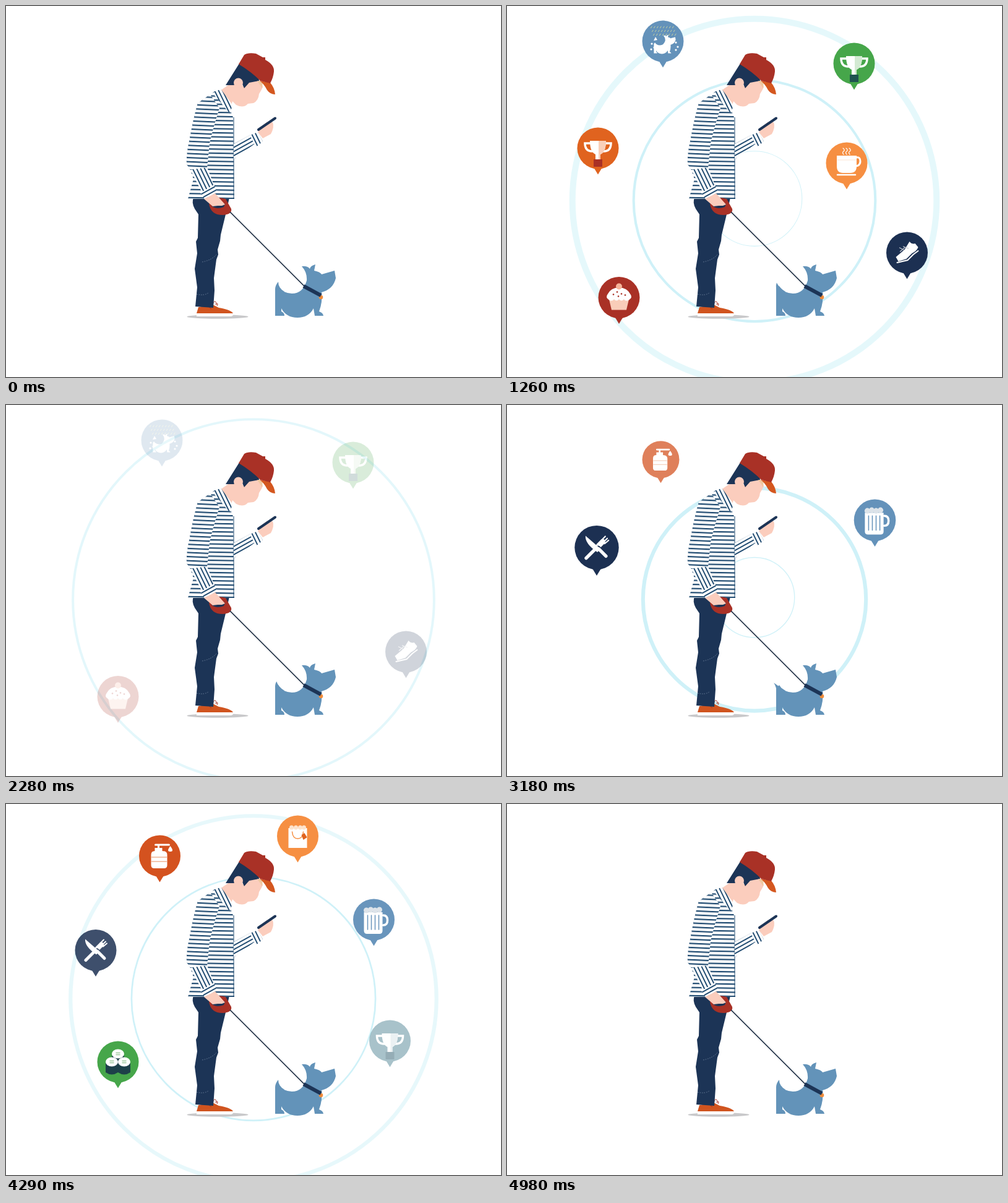
Write an HTML page that moves like this. It is 800 px wide and 600 px high and loops after 5010 ms.

```html
<!DOCTYPE html>
<html lang="en">
<head>
<meta charset="utf-8">
<title>Walking the dog</title>
<style>
html, body { margin: 0; width: 100%; height: 100%; overflow: hidden; background: #fff; }
svg { display: block; width: 800px; height: 600px; }
</style>
</head>
<body>
<svg viewBox="0 0 800 600">
  <defs>
    <pattern id="across" width="20" height="6.6" patternUnits="userSpaceOnUse" patternTransform="rotate(1)">
      <rect width="20" height="6.6" fill="#fff"/><rect width="20" height="2.2" fill="#1f4a70"/>
    </pattern>
    <pattern id="sleeve" href="#across" patternTransform="rotate(2.500)"/>
    <pattern id="down" href="#across" patternTransform="rotate(64) scale(.88)"/>
    <pattern id="slant" href="#across" patternTransform="rotate(-29) scale(.88)"/>
    <path id="dogBody" d="M435 458V501H450Q450 496 445 494V489Q453 504 471 504Q489 504 497 489L499 501H513Q512 496 506 494Q512 478 510 463Q529 458 533 440L531 428L510 434Q508 430 498 428L500 418Q492 420 491 425Q487 420 478 421Q487 431 486 444Q480 465 462 465Q446 464 440 453Z"/>
  </defs>

  <g id="rings" fill="none" stroke="#cff1f8"></g>
  <g id="pins"></g>

  <ellipse cx="342" cy="502.500" rx="49.500" ry="3.300" fill="#c8c8ca"/>
  <g id="man">
    <path d="M308 497H367V500Q366 502 362 502H308Z" fill="#fff"/>
    <path d="M308 497L311 487L334 483L344 488Q363 491 367 497Z" fill="#d0541f"/>
    <path d="M334 484q1-7 4-6t1 5q5-4 2 2M327 486l5 4" fill="none" stroke="#a93126"/>
    <path d="M304 308Q299 317 305 328L311 337L310 375L307 381L309 400L305 425L309 455L306 486L335 488L337 460L336 440L340 410L343 402L342 394L346 380L347 370L355 337L361 310L340 304Z" fill="#1c3456"/>
    <path d="M317 414Q333 411 341 401M308 466Q320 469 327 464" fill="none" stroke="#6d819c" stroke-dasharray="1.500 2"/>

    <path d="M346 137L362 126L368 122L385 130L394 121L411 121L415 131Q413 136 409 142Q408 153 400 157L391 158Q384 166 372 160L366 154L362 170Z" fill="#fbcdbd"/>
    <path d="M377 93L355 128H368L380 122L385 133L393 124L409 121L408 113Z" fill="#1c3456"/>
    <circle cx="375.500" cy="124" r="7.500" fill="#fbcdbd"/>
    <path d="M406 121L415 122L414 133Z" fill="#efc9a0"/>
    <path d="M410 121L427 124Q434 132 435 143Q427 143 422 136Q417 126 410 121Z" fill="#d4571f"/>
    <path d="M376 94L385 79Q391 75 404 77L415 83L419 83V87Q434 95 433 106Q432 116 427 125L411 121Q396 106 376 94Z" fill="#a93126"/>

    <path d="M340 136L310 157Q303 180 297 214Q291 240 292 256L298 265L303 280L294 312H369L367 180L362 168Z" fill="url(#across)"/>
    <path d="M330 143L310 157Q303 180 297 214Q291 240 292 256L298 265L325 262L329 222Q334 200 345 165Z" fill="url(#sleeve)"/>
    <path d="M368 180V312" stroke="#1f4a70"/>
    <path d="M334 141L347 134L366 160L362 174Z" fill="url(#down)"/>
    <path d="M298 265L325 261L337 292L317 302Z" fill="url(#down)"/>
    <path d="M314 302L336 289L342 301L321 312Z" fill="url(#slant)"/>
    <path d="M368 223L396 208L403 222L368 248Z" fill="url(#slant)"/>
    <path d="M394 209L407 204L415 219L404 228Z" fill="url(#down)"/>
    <path d="M407 204L413 195L421 188L431 188Q434 196 428 207L415 214Z" fill="#fbcdbd"/>
    <path d="M408 200L435 181.500" stroke="#1c3456" stroke-width="4" stroke-linecap="round"/>
    <path d="M328 320Q331 338 350 338Q366 337 364 328L355 312Q337 306 328 320Z" fill="#a93126"/>
    <path d="M332 323Q340 330 352 325L354 320L340 314Z" fill="#1c3456"/>
    <path d="M320 312L338 303L354 321L349 323L342 323L334 324Z" fill="#fbcdbd"/>
  </g>

  <g fill="#6393b9"><path id="tail"/><use href="#dogBody"/></g>
  <path d="M362 333L482 453" stroke="#1b2b40" stroke-width="1.700"/>
  <circle cx="509" cy="471" r="3.300" fill="#f08c3a"/>
  <path d="M481 453L509 468" stroke="#1c3456" stroke-width="6"/>
</svg>

<script>
const LOOP = 5010, HALF = LOOP / 2, RING_LIFE = 1420, RING_GAP = 517;
const NAVY = '#1c3052', RED = '#a93126', ORANGE = '#f68f42', BLUE = '#6492ba', GREEN = '#46a64a';
const $ = id => document.getElementById(id);
const clamp = v => Math.max(0, Math.min(1, v));
const add = (parent, tag, html = '') => {
  const el = document.createElementNS('http://www.w3.org/2000/svg', tag);
  el.innerHTML = html;
  return parent.appendChild(el);
};
const path = (d, fill = '#fff') => `<path d="${d}" fill="${fill}"/>`;
const line = (d, width = 2, stroke = '#fff') =>
  `<path d="${d}" fill="none" stroke="${stroke}" stroke-width="${width}" stroke-linecap="round"/>`;
const dot = (x, y, r, fill = '#fff') => `<circle cx="${x}" cy="${y}" r="${r}" fill="${fill}"/>`;

// Icons, drawn around the centre of their pin
const trophy = (base, shade) =>
  line('M-12 -8H-21Q-21 5 -9 5M12 -8H21Q21 5 9 5', 3.5) +
  path('M-13 -12H13Q13 6 4 10V18H-4V10Q-13 6 -13 -12Z') +
  path('M1 -12H13Q13 6 4 10V18H1Z', shade) + path('M-7 18H7V30H-7Z', base);

const mug =
  path('M-16 -12H16V5Q16 16 6 16H-6Q-16 16 -16 5Z') + line('M16 -9Q22 -10 22 -3T15 5', 3) +
  line('M-15 19H14', 2.5) + line('M-15 -5H15', 1, '#fbe3d1') +
  [-5, 0, 5].map(x => line(`M${x} -14q-3 -3 0 -5t-1 -5`, 1.2)).join('');

const shoe =
  path('M-18 7L-4 -5L4 -18Q8 -13 13 -15L18 -9Q16 -3 8 1L-1 10L-14 14Z') +
  line('M-16 16L1 12L10 3L18 -3', 2) + line('M-12 -8l8 4m-7 2l7 -6m-2 -2l8 3', 1.3, '#c7cbd3');

let rain = '';
for (let i = 0; i < 24; i++) rain += line(`M${i % 8 * 5 - 18 + (i >> 3) * 2} ${(i >> 3) * 6 - 24}l-1.500 2.500`, 1, '#c9d3a0');
const rainyDog = rain +
  '<use href="#dogBody" fill="#fff" transform="translate(3 5) scale(.36) translate(-484 -461)"/>' +
  path('M-15 -1L-12 -7L-9 -2Z') +
  [[-18, 4], [-14, 10], [-19, 13], [21, 2], [24, 9], [21, 14]].map(([x, y]) => dot(x, y, 1.6)).join('');

const cupcake =
  path('M-16 3H16L12 20H-12Z', '#f9cdb9') +
  path('M-16 4Q-23 0 -18 -6Q-13 -16 0 -16T18 -6Q23 0 16 4Q11 7 8 3Q4 7 0 3Q-4 7 -8 3Q-12 7 -16 4Z') +
  dot(0, -18, 5, '#f6b49a') +
  [[-9, -5], [-3, -9], [4, -6], [10, -4], [-1, -2]].map(([x, y]) => dot(x, y, 1.3, RED)).join('');

const cutlery =
  line('M-16 16L4 -4', 5) + line('M3 -3L9 -9', 8) + line('M7 -11L13 -17M10 -8L16 -14M12 -6L18 -11', 2) +
  line('M2 1L14 13', 8, NAVY) + line('M3 2L14 13', 5) + path('M-17 -18Q-18 -6 1 7L6 2Z');

const pump =
  path('M-14 -2Q-14 -8 -8 -8V-13H4V-8Q12 -8 12 -2V15Q12 20 7 20H-9Q-14 20 -14 15Z') +
  line('M-7 -18H15M-2 -18V-13', 3) + path('M17 -16Q24 -7 17 -7T17 -16Z') +
  line('M-13 2H11M-13 9H11', 1.3, '#efb493');

const beer =
  line('M15 -7Q22 -7 22 1T15 9', 3.5) + path('M-16 -12H14V18Q14 23 9 23H-11Q-16 23 -16 18Z') +
  [-12, -5, 2, 9].map((x, i) => dot(x, -15 - i % 2, 4.5, '#dce3e9')).join('') +
  line('M-10 -7V16M-4 -7V16M2 -7V16M8 -7V16', 1.5, BLUE);

const bag =
  path('M-15 -13H15V19H-15Z') + [-10, -3, 4, 10].map(x => dot(x, -14, 3.5, '#fde3cd')).join('') +
  line('M-9 -7Q-8 4 0 4T9 -7', 1.5, ORANGE) + path('M6 -2l5 -3l4 7l-6 4z', '#e0631f');

const roll = (x, y) =>
  `<ellipse cx="${x}" cy="${y}" rx="10" ry="7.500" fill="#fff"/>` +
  line(`M${x - 3} ${y - 1.5}h6m-6 3h6`, 1.5, '#9bc79a');
const sushi =
  path('M-20 2H0V17Q-10 24 -20 17ZM0 2H20V17Q10 24 0 17Z', '#1d4049') +
  path('M-10 -10H10V2H-10Z', '#1d4049') + roll(0, -13) + roll(-10, 0) + roll(10, 0);

// x, y, colour, icon, time in, start of fade, sideways drift while growing
const pins = [
  [549, 254, ORANGE, mug, 460, 1470],
  [561, 93, GREEN, trophy('#1f5350', '#d3ead2'), 560, 1800],
  [147, 230, '#e0631f', trophy(RED, '#f9cfba'), 660, 1470],
  [646.5, 399, NAVY, shoe, 778, 1800, 8],
  [252, 57, BLUE, rainyDog, 870, 1800],
  [181, 471.5, RED, cupcake, 970, 1800],
  [594.5, 187, BLUE, beer, 2930, 4270],
  [145, 236.5, NAVY, cutlery, 3035, 4200],
  [248.5, 84, '#d4521f', pump, 3108, 4290],
  [620.5, 383, '#709ba8', trophy('#4f7886', '#dfe9ec'), 3185, 4050],
  [471.5, 52, ORANGE, bag, 3290, 4290],
  [181, 417, GREEN, sushi, 3390, 4290]
].map(([x, y, color, icon, start, fade, drift = 0]) => ({
  x, y, start, fade, drift,
  el: add($('pins'), 'g', dot(0, 0, 33.5, color) + path('M-7 31H7L0 42.500Z', color) + icon)
}));

const rings = [.034, .021, .0135].map(weight => ({ weight, el: add($('rings'), 'circle') }));
const growth = [[0, 38], [155, 64], [290, 88], [540, 144], [675, 180], [810, 210], [1080, 264],
  [1190, 282], [1265, 295], [1330, 307], [RING_LIFE, 312]];

function radiusAt(age) {
  const i = growth.findIndex(p => p[0] > age);
  const [t0, r0] = growth[i - 1], [t1, r1] = growth[i];
  return r0 + (r1 - r0) * (age - t0) / (t1 - t0);
}

function set(el, attrs) {
  for (const key in attrs) el.setAttribute(key, attrs[key]);
}

function drawRing({ weight, el }, age) {
  if (age < 0 || age >= RING_LIFE) return set(el, { opacity: 0 });
  const r = radiusAt(age);
  set(el, {
    cx: 400, cy: Math.min(315, 309.5 + r * .027), r, 'stroke-width': r * weight,
    opacity: clamp(age / 100) * clamp((RING_LIFE - age) / 300)
  });
}

function drawPin({ x, y, start, fade, drift, el }, t) {
  const age = t - start;
  const opacity = clamp(age / 100) * clamp(1 - (t - fade) / 600);
  const s = age > 0 ? 1 - Math.exp(-age / 60) * Math.cos(Math.PI * age / 190) : 0;
  const lift = 40 * (1 - s) - 50 * Math.max(0, s - 1);
  set(el, { opacity, transform: `translate(${x + drift * (1 - s)} ${y + lift}) scale(${s})` });
}

function draw() {
  const t = performance.now() % LOOP;
  rings.forEach((ring, i) => drawRing(ring, t % HALF - i * RING_GAP));
  pins.forEach(pin => drawPin(pin, t));
  const wag = Math.cos(t / LOOP * 7 * 2 * Math.PI);
  const tipX = 435.5 + 4.5 * wag, tipY = 447.7 - 1.7 * wag;
  set($('tail'), { d: `M${tipX} ${tipY}Q440 456 450 462L445 475L435 470V458Q${434 + wag} 452 ${tipX} ${tipY}Z` });
  requestAnimationFrame(draw);
}
draw();
</script>
</body>
</html>
```
